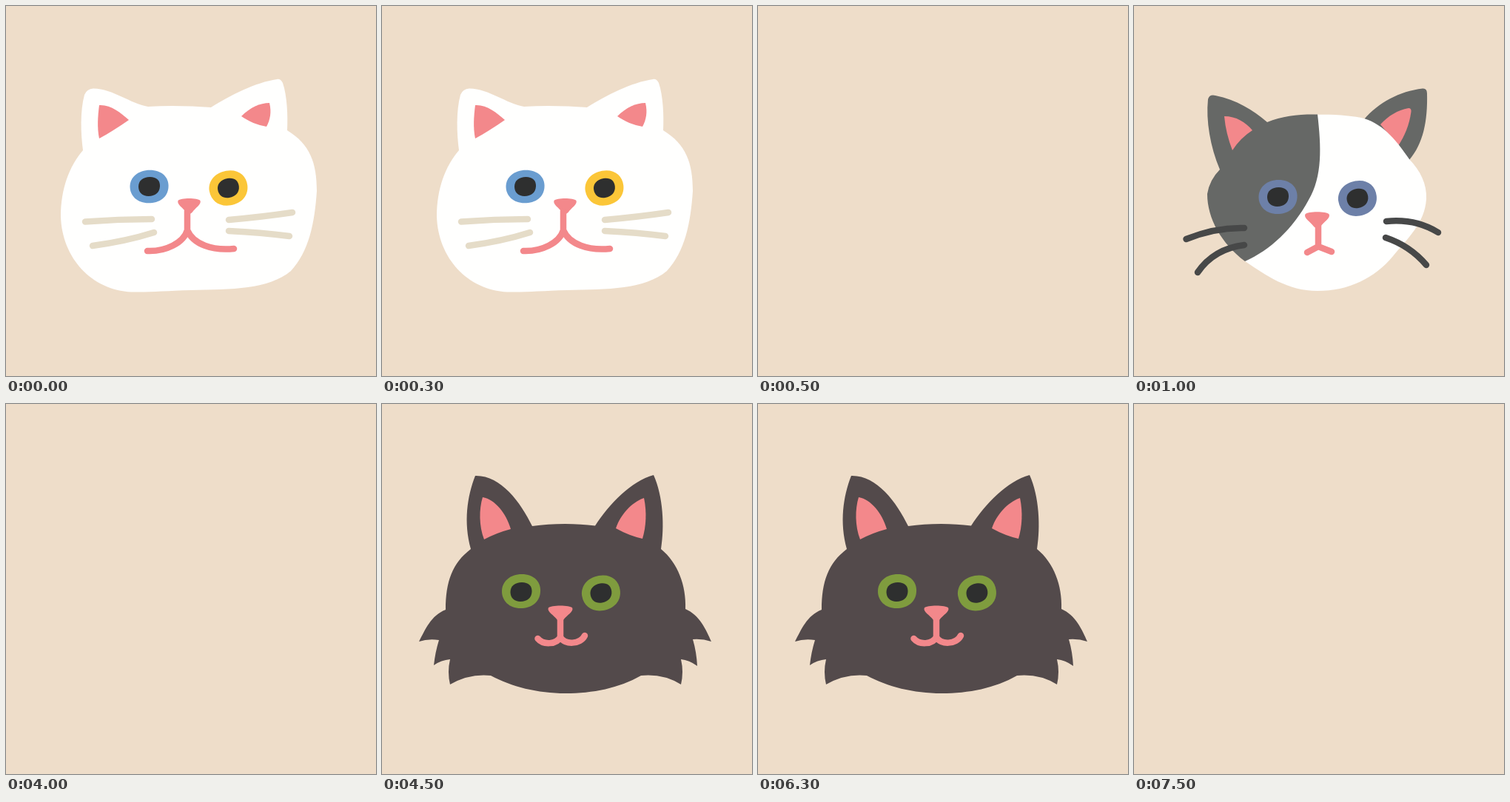
Write an HTML page without scripts that moves like this. It is 500 by 500 pixels and loops after 8 s.

```html
<!DOCTYPE html>
<html lang="en">
<head>
<meta charset="utf-8">
<title>Three cats</title>
<style>
  html, body { margin: 0; width: 100%; height: 100%; overflow: hidden; background: #eeddc9; }
  svg { display: block; width: 100vw; height: 100vh; }

  /* Each cat appears and vanishes with a hard cut. */
  .cat { visibility: hidden; animation: 8s step-end infinite; }
  .white { animation-name: first; }
  .patched { animation-name: second; }
  .dark { animation-name: third; }
  @keyframes first { 0% { visibility: visible; } 6.25%, 100% { visibility: hidden; } }
  @keyframes second { 0% { visibility: hidden; } 12.5% { visibility: visible; } 50%, 100% { visibility: hidden; } }
  @keyframes third { 0% { visibility: hidden; } 56.25% { visibility: visible; } 93.75%, 100% { visibility: hidden; } }

  .pink { fill: #f3888b; }
  .grey { fill: #666866; }
  .snow { fill: #fffffe; }
  .coal { fill: #534a4b; }
  .pupil { fill: #2e2f2f; }
  .line { fill: none; stroke-width: 8.5; stroke-linecap: round; stroke-linejoin: round; }
  .mouth { stroke: #f3888b; }
  .cream { stroke: #e5dcc8; }
  .slate { stroke: #474848; }
</style>
</head>
<body>
<svg viewBox="0 0 500 500">
  <defs>
    <path id="iris" d="M-26 0C-26-13-15-23 1-23C17-23 27-13 26 1C25 15 14 23-1 23C-16 23-26 13-26 0Z"/>
    <path id="pupil" class="pupil" d="M-14.5 0C-14.5-8-8-13 1-13C10-13 15-8 14.5 0C14 8 8 13-1 13C-9 13-14.5 8-14.5 0Z"/>
    <path id="nose" class="pink" d="M-15 0C-12-4 12-4 15 0C17 5 8 10 4 16Q0 20-4 16C-8 10-17 5-15 0Z"/>
  </defs>

  <g class="cat white">
    <path class="snow" d="M104 195C101 172 100 142 106 120Q109 112 118 111.500C145 112 168 132 192 136C220 134 250 135 277 137C302 121 338 103 366 99Q371 98 374 104C380 122 381 148 380 168C411 187 420 212 420 250C417 295 409 332 385 358C355 383 305 383 250 384C215 385 195 387 170 386.500C115 384 76 340 74 285C74 246 86 216 104 195Z"/>
    <path class="pink" d="M126 134C141 133 155 144 166 154C153 163 139 172 126 179C123 165 124 149 126 134Z"/>
    <path class="pink" d="M318 149C330 137 343 131 356 131C359 143 357 154 352 163C340 161 328 156 318 149Z"/>
    <g transform="translate(193.500 244)">
      <use href="#iris" fill="#6a9dd0" transform="scale(1 .97)"/>
      <use href="#pupil"/>
    </g>
    <g transform="translate(300.500 246) rotate(-10)">
      <use href="#iris" fill="#fbc638" transform="scale(1 1.020)"/>
      <use href="#pupil"/>
    </g>
    <use href="#nose" x="247.500" y="263"/>
    <path class="line mouth" d="M245 277V303C240 320 216 332 191 331M245 303C253 322 279 331 308 328"/>
    <path class="line cream" d="M107 291.500Q152 288 197 288M117 324Q162 318 200 306M301 289Q346 285 387 279M301 304Q345 306 383 311"/>
  </g>

  <g class="cat patched">
    <path class="grey" d="M311 153C330 131 359 115 390 111.500Q396 111 396 118C397 155 391 186 372 208Z"/>
    <path class="pink" d="M333 160C344 148 356 141 371 138Q375 138 374.500 143C372 161 366 175 357 189Z"/>
    <path class="snow" d="M240 147C270 146 295 148 311 152C338 160 357 185 372 207C387 223 396 240 395 261C393 293 370 314 350 338C325 368 290 385 248 385C207 385 179 364 150 345L190 230Z"/>
    <path class="grey" d="M116 221C103 190 97 155 100 126Q102 119 110 121C139 127 160 140 180 157C201 148 225 146 248 146.500C253 190 255 230 236 262C215 301 184 330 150 345C118 321 99 287 99 254Q102 235 116 221Z"/>
    <path class="pink" d="M122 149C138 149 151 157 160 168Q144 178 133 195Q124 172 122 149Z"/>
    <g transform="translate(194.500 258)">
      <use href="#iris" fill="#6d80a8"/>
      <use href="#pupil"/>
    </g>
    <g transform="translate(302 260) rotate(-10)">
      <use href="#iris" fill="#6d80a8" transform="scale(1 1.030)"/>
      <use href="#pupil"/>
    </g>
    <use href="#nose" transform="translate(247.500 281.500) scale(1.080 1.050)"/>
    <path class="line mouth" d="M249 296V325L234 333M249 325L267 332"/>
    <path class="line slate" d="M70.500 315Q110 299 149 300M86 360Q108 328 149 323M341 291Q380 287 411 306M340 313Q373 324 395 350"/>
  </g>

  <g class="cat dark">
    <path class="coal" d="M120 196C110 160 115 125 126 97C160 96 187 132 203 165C230 161 262 161 288 164.500C307 135 337 104 367 96C380 125 382 165 377 196C400 215 411 245 410 277C429 285 438 305 445 321Q433 317 420 318Q425 335 426 354Q415 346 404 345Q408 362 404 379Q380 364 350 367C320 384 285 391 248 391C210 391 175 382 147 367Q118 364 92 379Q88 362 92 345Q80 346 70 353Q72 335 77 319Q62 317 50 321C59 304 66 286 86 278C86 240 95 215 120 196Z"/>
    <path class="pink" d="M136 126C153 129 168 148 174 169Q155 174 138 183C131 165 131 142 136 126Z"/>
    <path class="pink" d="M354 127C358 146 357 165 352 182Q334 178 316 168C322 150 337 133 354 127Z"/>
    <g transform="translate(188 253)">
      <use href="#iris" fill="#7f9c3e"/>
      <use href="#pupil" y="1"/>
    </g>
    <g transform="translate(296 255.500) rotate(-10)">
      <use href="#iris" fill="#7f9c3e" transform="scale(1 1.030)"/>
      <use href="#pupil"/>
    </g>
    <use href="#nose" transform="translate(241 275.500) scale(1.080 1)"/>
    <path class="line mouth" d="M241 290V315C236 325 218 326 210.500 317M241 315C247 326 268 325 274 313"/>
  </g>
</svg>
</body>
</html>
```
